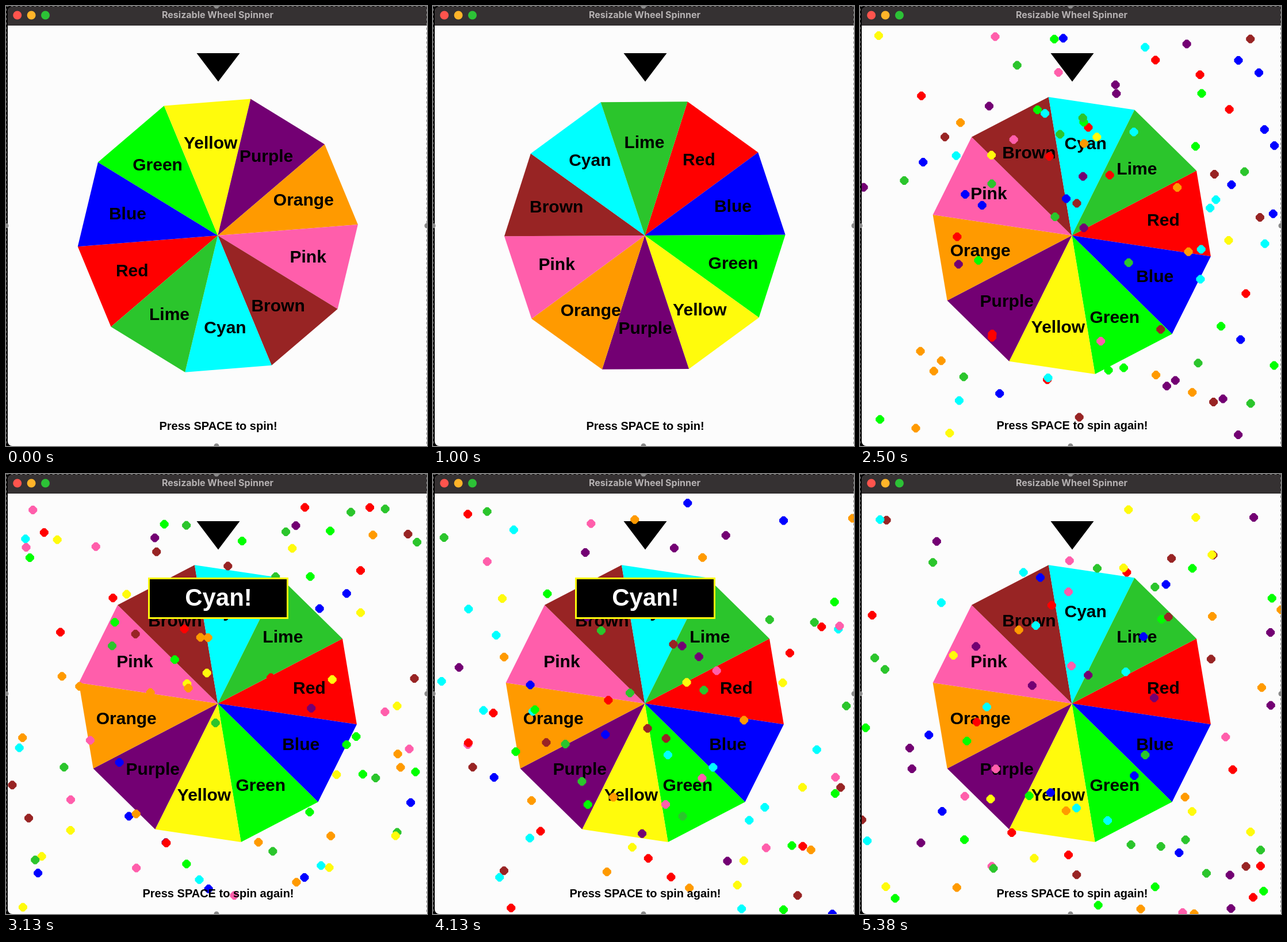
Animation, 732 px wide and 765 px high, one loop 5510 ms. Source, as an HTML page with a canvas:

```html
<!DOCTYPE html>
<html lang="en">
<head>
<meta charset="utf-8">
<title>Wheel Spinner</title>
<style>
  html, body { margin: 0; overflow: hidden; background: #000; }
  canvas { display: block; }
</style>
</head>
<body>
<canvas id="stage" width="732" height="765"></canvas>
<script>
const ctx = document.getElementById('stage').getContext('2d');
const W = 732, H = 765, LOOP = 5510, STEP = 125, LAST_STEP = 43;
const CX = 368.3, CY = 399.1, RADIUS = 244.3, LABEL_RADIUS = 161.3;
const FONT = '"Liberation Sans", Arial, sans-serif';
const SLICE = 36;

// Friction takes 2% of the speed every 1/60 s until the wheel is slow enough to stop.
const FINAL_ANGLE = 332.5, SWING = 211, CUTOFF = 18, FRICTION = 1.212;
const STOP_TIME = Math.log(SWING / CUTOFF) / FRICTION;
const FLASH = 0.25, CONFETTI = 100;

const slices = [
  ['Red', '#ff0000'], ['Blue', '#0000ff'], ['Green', '#00ff00'],
  ['Yellow', '#fffb0c'], ['Purple', '#730073'], ['Orange', '#ff9a00'],
  ['Pink', '#ff5eab'], ['Brown', '#982424'], ['Cyan', '#00ffff'],
  ['Lime', '#2bc52c']
];

function polygon(points, color) {
  ctx.fillStyle = color;
  ctx.beginPath();
  for (const [x, y] of points) ctx.lineTo(x, y);
  ctx.fill();
}

function disc(x, y, r, color) {
  ctx.fillStyle = color;
  ctx.beginPath();
  ctx.arc(x, y, r, 0, 2 * Math.PI);
  ctx.fill();
}

function text(string, x, baseline, size, color = '#000', family = FONT) {
  ctx.font = `bold ${size}px ${family}`;
  ctx.fillStyle = color;
  ctx.textAlign = 'center';
  ctx.fillText(string, x, baseline);
}

function polar(degrees, r) {
  const a = degrees * Math.PI / 180;
  return [CX + r * Math.cos(a), CY + r * Math.sin(a)];
}

function seededRandom(seed) {
  return () => {
    seed = (seed + 0x6D2B79F5) | 0;
    let n = Math.imul(seed ^ (seed >>> 15), 1 | seed);
    n = (n + Math.imul(n ^ (n >>> 7), 61 | n)) ^ n;
    return ((n ^ (n >>> 14)) >>> 0) / 4294967296;
  };
}

function drawWindow() {
  ctx.fillStyle = '#000';
  ctx.fillRect(0, 0, W, H);
  ctx.fillStyle = '#fcfcfc';
  ctx.beginPath();
  ctx.roundRect(3, 2, W - 3, H - 2, [8, 0, 0, 8]);
  ctx.fill();
  ctx.fillStyle = '#353132';
  ctx.beginPath();
  ctx.roundRect(3, 1, W - 3, 33, [8, 0, 0, 0]);
  ctx.fill();
  ctx.fillStyle = '#242122';
  ctx.fillRect(3, 33, W - 3, 1);
  ['#ff544d', '#ffb429', '#2cc136'].forEach((color, i) => disc(19.7 + 24.4 * i, 16, 7.5, color));
  text('Resizable Wheel Spinner', 368, 21, 16, '#b5b1b2', 'Inter, sans-serif');
}

function drawSelection() {
  ctx.lineWidth = 1;
  ctx.strokeStyle = '#8a8a8a';
  ctx.setLineDash([4, 4]);
  ctx.strokeRect(0.5, 0.5, W - 1, H);
  ctx.setLineDash([]);
  for (const [x, y] of [[366, 0], [366, H], [0, 382], [W, 382]]) disc(x, y, 4.5, '#8a8a8a');
}

function drawWheel(angle) {
  slices.forEach(([, color], i) => {
    const start = angle + i * SLICE;
    polygon([[CX, CY], polar(start, RADIUS), polar(start + SLICE, RADIUS)], color);
  });
  slices.forEach(([name], i) => {
    const [x, y] = polar(angle + (i + 0.5) * SLICE, LABEL_RADIUS);
    text(name, x, y + 9.3, 30);
  });
}

function drawConfetti(seed) {
  const random = seededRandom(seed);
  const a = 7.5, b = 2.2;
  const octagon = [[-b, -a], [b, -a], [a, -b], [a, b], [b, a], [-b, a], [-a, b], [-a, -b]];
  ctx.save();
  ctx.beginPath();
  ctx.rect(3, 34, W - 3, H - 34);
  ctx.clip();
  for (let i = 0; i < CONFETTI; i++) {
    const x = 3 + random() * (W - 3), y = 34 + random() * (H - 34);
    const color = slices[Math.floor(random() * slices.length)][1];
    polygon(octagon.map(([dx, dy]) => [x + dx, y + dy]), color);
  }
  ctx.restore();
}

function drawBanner() {
  ctx.fillStyle = '#fffb0c';
  ctx.fillRect(247, 180, 244, 72);
  ctx.fillStyle = '#000';
  ctx.fillRect(250, 183, 238, 66);
  text('Cyan!', 369.5, 229, 42, '#fff');
}

function draw(ms) {
  const step = Math.min(LAST_STEP, Math.floor(ms / STEP));
  const time = step * STEP / 1000;
  const stopped = time >= STOP_TIME;
  const remaining = stopped ? 0 : SWING * Math.exp(-FRICTION * time) - CUTOFF;

  drawWindow();
  drawWheel(FINAL_ANGLE - remaining);
  polygon([[331.5, 82], [406.5, 82], [369, 131.5]], '#000');
  if (stopped) {
    drawConfetti(step);
    if (Math.floor((time - STOP_TIME) / FLASH) % 2 === 0) drawBanner();
    text('Press SPACE to spin again!', 369, 736, 20);
  } else {
    text('Press SPACE to spin!', 369, 737, 20);
  }
  drawSelection();
}

function tick() {
  draw(performance.now() % LOOP);
  requestAnimationFrame(tick);
}
tick();
</script>
</body>
</html>
```
